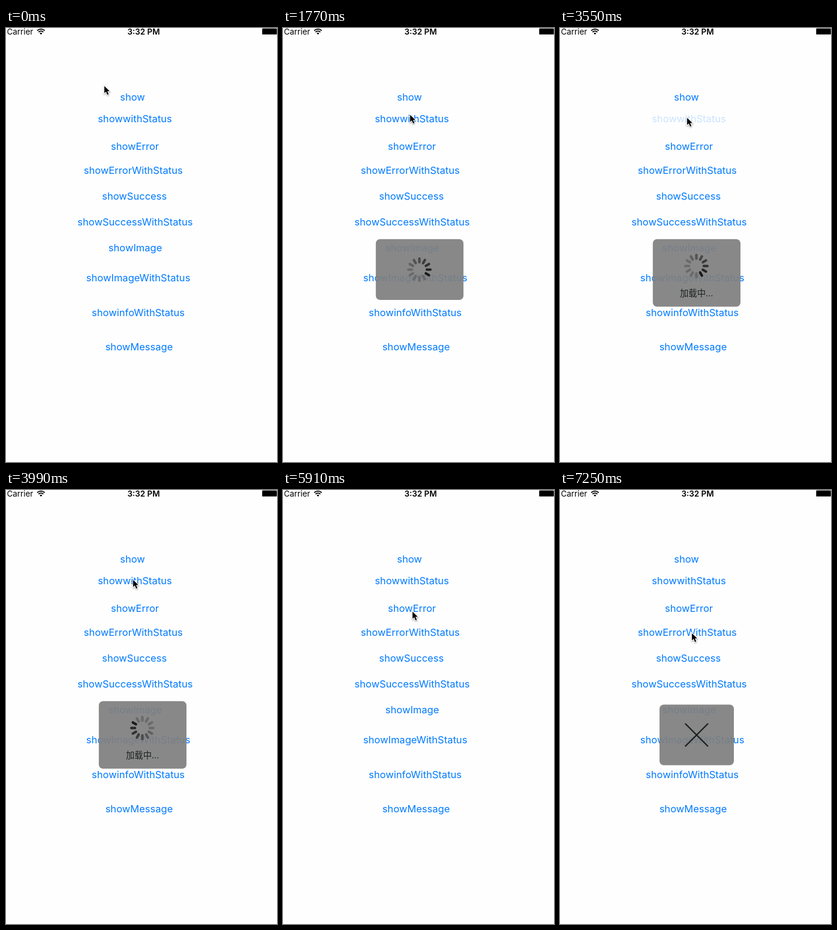
An HTML page that plays this animation: 452 px wide and 723 px high, repeating every 8 s.

```html
<!DOCTYPE html>
<html lang="en">
<head>
<meta charset="utf-8">
<title>HUD demo</title>
<style>
  html, body { margin: 0; width: 100%; height: 100%; overflow: hidden; background: #fefefe; }
  svg { display: block; width: 452px; height: 723px; }
  text { font-family: Inter, "Noto Sans CJK SC", "Noto Sans CJK", sans-serif; text-anchor: middle; }
  #buttons { font-size: 16.5px; letter-spacing: .02px; fill: #007aff; }
  .status { font-size: 13.4px; }
  #cursor { filter: drop-shadow(0 1px 1px rgba(0, 0, 0, .4)); }
</style>
</head>
<body>
<svg viewBox="0 0 452 723">
  <text class="status" x="1.5" y="11" style="text-anchor:start">Carrier</text>
  <g fill="none" stroke="#000" stroke-width="1.9">
    <path d="M52 4.4A9 9 0 0 1 64.6 4.4M54.3 6.8A5.7 5.7 0 0 1 62.3 6.8"/>
    <path d="M58.3 10.9L56.2 8.8A3 3 0 0 1 60.4 8.8Z" fill="#000" stroke="none"/>
  </g>
  <text class="status" x="229.5" y="11" font-weight="600">3:32 PM</text>
  <rect x="427" y=".5" width="25" height="10.5" rx="1.5" fill="#444"/>
  <rect x="428" y="1.5" width="23" height="8.5" rx="1"/>
  <g id="buttons"></g>
  <g id="hud">
    <rect id="panel" rx="7" fill="#7f7f7f" fill-opacity=".925"/>
    <g id="spinner" stroke-width="4.2" stroke-linecap="round"></g>
    <text id="label" x="227.7" y="447" font-size="14.3" fill="#1d2020">加载中...</text>
    <path id="cross" d="M208.7 389L247 427.3M247 389L208.7 427.3" stroke="#1a1f1f" stroke-width="2.3"/>
  </g>
  <path id="cursor" d="M1 1.7V13.6L3.9 10.9 6.2 16.2 8.2 15.3 6 10.2H9.9Z"
        stroke="#fff" stroke-width="2" paint-order="stroke"/>
</svg>
<script>
const LOOP = 8000, TICK = 147.6;
const $ = id => document.getElementById(id);

function add(parent, tag, attrs, text = '') {
  const el = document.createElementNS('http://www.w3.org/2000/svg', tag);
  for (const name in attrs) el.setAttribute(name, attrs[name]);
  el.textContent = text;
  return parent.appendChild(el);
}

const buttons = [
  ['show', 211, 121], ['showwithStatus', 215, 156.5], ['showError', 215, 202.7],
  ['showErrorWithStatus', 212.2, 243], ['showSuccess', 214.2, 286],
  ['showSuccessWithStatus', 215.4, 329], ['showImage', 215.6, 371.5],
  ['showImageWithStatus', 220.6, 422], ['showinfoWithStatus', 220.6, 479.5],
  ['showMessage', 222, 537]
].map(([name, x, y]) => add($('buttons'), 'text', { x, y }, name));

const spokes = Array.from({ length: 12 }, (_, i) =>
  add($('spinner'), 'line', { y1: -12.4, y2: -18.4, transform: `rotate(${i * 30})` }));

// Each HUD: visible ticks, panel box, spinner centre, leading spoke and spokes per tick
const huds = [
  { from: 6, to: 21, box: [154.8, 351.8, 146.2, 101.2], cy: 402.5, head: 7, rate: 26 / 14 },
  { from: 24, to: 40, box: [154.8, 351.8, 146.2, 112.4], cy: 396.5, head: 4.86, rate: 12 / 7, label: true },
  { from: 42, to: 99, box: [166, 357.5, 124, 101], cross: true }
];

// Cursor stops: tick, x, y
const stops = [
  [0, 163, 95], [3, 208, 116], [8, 208, 116], [12, 211, 148], [28, 211, 148],
  [31, 216, 204], [32, 215, 201], [44, 215, 201], [47, 219, 239], [48, 219, 239], [49, 219, 237]
];

function cursorAt(tick) {
  const next = stops.findIndex(s => s[0] > tick);
  if (next < 0) return stops[stops.length - 1].slice(1);
  const [a, b] = [stops[next - 1], stops[next]];
  const p = (tick - a[0]) / (b[0] - a[0]), ease = p * p * (3 - 2 * p);
  return [1, 2].map(i => Math.round(a[i] + (b[i] - a[i]) * ease));
}

const show = (id, on) => $(id).setAttribute('display', on ? 'inline' : 'none');

function draw(time) {
  const tick = Math.floor(time % LOOP / TICK);
  $('cursor').setAttribute('transform', `translate(${cursorAt(tick)})`);

  // A tapped button fades back as its HUD opens
  huds.forEach(({ from }, i) => {
    const age = tick - from;
    buttons[i].setAttribute('opacity', age < 0 ? 1 : Math.min(1, .2 + age * .4));
  });

  const hud = huds.find(h => tick >= h.from && tick < h.to);
  show('hud', hud);
  if (!hud) return;
  ['x', 'y', 'width', 'height'].forEach((name, i) => $('panel').setAttribute(name, hud.box[i]));
  show('label', hud.label);
  show('cross', hud.cross);
  show('spinner', !hud.cross);
  if (hud.cross) return;
  $('spinner').setAttribute('transform', `translate(227.5 ${hud.cy})`);
  const head = Math.round(hud.head + hud.rate * (tick - hud.from));
  spokes.forEach((spoke, i) => {
    const lag = ((head - i) % 12 + 12) % 12;
    const grey = 26 + 80 * Math.min(1, lag / 7);
    spoke.setAttribute('stroke', `rgb(${grey},${grey},${grey})`);
  });
}

function frame() {
  draw(performance.now());
  requestAnimationFrame(frame);
}
frame();
</script>
</body>
</html>
```
